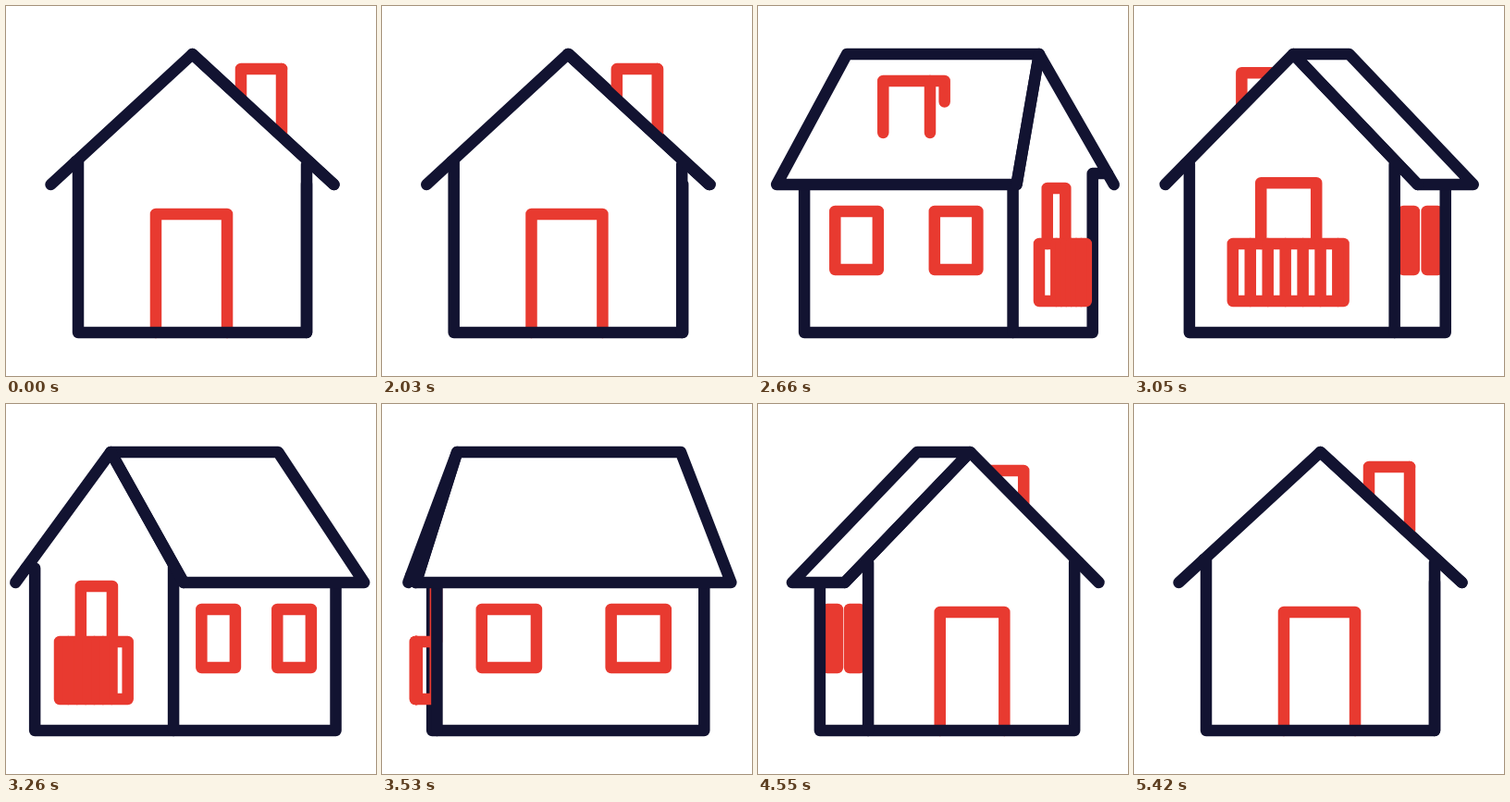
An HTML page with a canvas that plays this animation: 400 px wide and 400 px high, repeating every 5.45 s.

```html
<!DOCTYPE html>
<html lang="en">
<head>
<meta charset="utf-8">
<title>Turning house</title>
<style>
html, body { margin: 0; width: 100%; height: 100%; overflow: hidden; background: #fff; }
canvas { display: block; width: 400px; height: 400px; }
</style>
</head>
<body>
<canvas id="stage" width="400" height="400"></canvas>
<script>
const ctx = document.getElementById('stage').getContext('2d');
const NAVY = '#121331', RED = '#e83a30';
const LOOP = 5450, START = 2030, STEP = 30, TURN = 3400;
const RIDGE = 52, EAVE = 193, BASE = 353;

const mix = (a, b, k) => a + (b - a) * k;

// Cubic Bezier ease (.18, 0, .245, 1)
function ease(x) {
  let lo = 0, hi = 1;
  for (let i = 0; i < 24; i++) {
    const s = (lo + hi) / 2, r = 1 - s;
    if (0.54 * r * r * s + 0.735 * r * s * s + s ** 3 < x) lo = s; else hi = s;
  }
  return lo * lo * (3 - 2 * lo);
}

function draw(phase) {
  const m = phase % 4;
  const mirrored = m < 2;
  const q = mirrored ? 2 - m : m - 2;      // 0 side view, 1 corner view, 2 gable view
  const hasDoor = phase < 2 || phase >= 6;
  const chimneyInFront = phase < 4;
  const key = (side, corner, gable) =>
    q < 1 ? mix(side, corner, q) : mix(corner, gable, q - 1);

  function path(points, stroke, fill, close) {
    ctx.beginPath();
    points.forEach(([x, y]) => ctx.lineTo(x, y));
    if (close) ctx.closePath();
    if (fill) { ctx.fillStyle = fill; ctx.fill(); }
    if (stroke) { ctx.strokeStyle = stroke; ctx.stroke(); }
  }
  const box = (x0, y0, x1, y1) =>
    path([[x0, y0], [x1, y0], [x1, y1], [x0, y1]], RED, null, true);

  ctx.setTransform(1, 0, 0, 1, 0, 0);
  ctx.fillStyle = '#fff';
  ctx.fillRect(0, 0, 400, 400);
  if (mirrored) ctx.setTransform(-1, 0, 0, 1, 403, 0);
  ctx.lineWidth = 12.5;
  ctx.lineCap = ctx.lineJoin = 'round';

  const left = key(55, 45, 78), corner = key(348, 200, 78), right = key(348, 376, 325);
  const ridge = key(79, 114, 201.5), apex = key(323, 284, 201.5);
  const eaveL = key(26, 14, 48.5), eaveC = key(372, 183, 48.5), eaveR = key(374, 396, 354.5);
  const chimneyTop = key(82, 80, 68);

  if (!chimneyInFront) {
    const a = key(200, 233, 254), b = key(200, 266, 298);
    path([[a, 130], [a, chimneyTop], [b, chimneyTop], [b, 137]], RED);
  }
  // Balcony peeking out behind the far wall
  if (hasDoor && q < 1) box(left - 20 * (1 - q), 257, left, 319);

  // Faces
  path([[left, EAVE], [corner, EAVE], [corner, BASE], [left, BASE]], null, '#fff');
  path([[apex, RIDGE], [eaveR, EAVE], [right, EAVE], [right, BASE],
    [corner, BASE], [corner, EAVE], [eaveC, EAVE]], null, '#fff');

  // Side windows
  if (corner - left > 2) {
    box(key(97, 69, 78), 222, key(157, 101.5, 78), 285);
    box(key(239, 140.5, 78), 222, key(299, 173, 78), 285);
  }

  if (hasDoor) {
    const a = mix(corner, right, 0.348), b = mix(corner, right, 0.66);
    path([[a, BASE], [a, 225], [b, 225], [b, BASE]], RED);
  }

  // Walls
  const hookY = key(186, 176, 168);
  const hookX = mix(apex, eaveR, (hookY - RIDGE) / (EAVE - RIDGE));
  path([[left, EAVE], [left, BASE], [right, BASE], [right, hookY], [hookX, hookY]], NAVY);

  if (!hasDoor) {
    const w0 = key(346, 278, 166), w1 = key(346, 318, 237), top = key(197, 197, 188);
    path([[w0, 257], [w0, top], [w1, top], [w1, 257]], RED);
    const back = key(348, 258, 131.5), a = key(368, 275, 131.5), b = key(368, 341, 271.5);
    box(back, 257, a, 319);
    box(a, 257, b, 319);
    for (let i = 1; i < 6; i++) {
      const x = mix(a, b, i / 6);
      path([[x, 257], [x, 319]], RED);
    }
  }
  path([[corner, 172], [corner, BASE]], NAVY);

  // Roof
  path([[ridge, RIDGE], [apex, RIDGE], [eaveC, EAVE], [eaveL, EAVE]], NAVY, '#fff', true);
  if (chimneyInFront) {
    const a = key(171, 98, 105), b = key(231, 139, 105), c = key(232, 170, 149);
    const inner = key(104, 103, 99);
    path([[a, 137], [a, chimneyTop], [c, chimneyTop], [c, inner], [b, 137]], null, '#fff');
    path([[a, 137], [a, chimneyTop], [b, chimneyTop], [b, 137]], RED);
    path([[b, chimneyTop], [c, chimneyTop], [c, inner]], RED);
  }
  path([[eaveC, EAVE], [apex, RIDGE], [eaveR, EAVE]], NAVY);
}

function frame(now) {
  const t = now % LOOP;
  const steps = Math.max(0, Math.floor((t - START) / STEP) + 1);
  const x = Math.min(1, steps * STEP / TURN);
  draw(x < 1 ? ease(x) * 8 : 0);
  requestAnimationFrame(frame);
}
frame(0);
</script>
</body>
</html>
```
